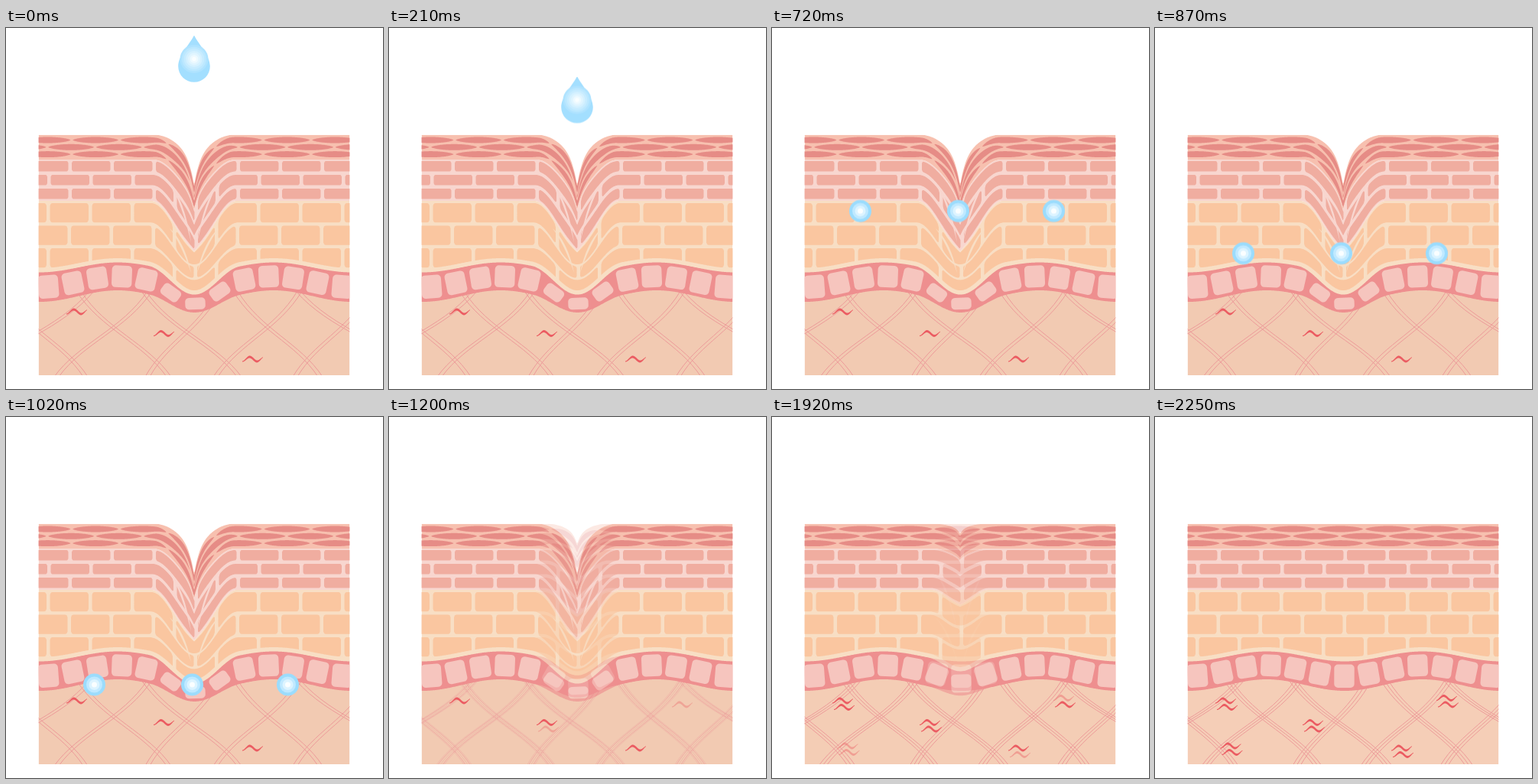
Write an HTML page with a canvas that moves like this. It is 493 by 472 pixels and loops after 2730 ms.

```html
<!DOCTYPE html>
<html lang="en">
<head>
<meta charset="utf-8">
<title>Skin hydration</title>
<style>
html, body { margin: 0; width: 100%; height: 100%; overflow: hidden; background: #fff; }
canvas { display: block; width: 493px; height: 472px; }
</style>
</head>
<body>
<canvas id="stage"></canvas>
<script>
const W = 493, H = 472, LOOP = 2730, STEP = 30;
const LEFT = 42.6, RIGHT = 449.4, TOP = 139.7, BOTTOM = 454, MID = 246;
const CREAM = '#f8dec4', BLUSH = '#f8d6cf';
const dpr = window.devicePixelRatio || 1;

const lerp = (a, b, u) => a + (b - a) * u;
const ramp = (t, a, b) => Math.max(0, Math.min(1, (t - a) / (b - a)));

function setup(canvas) {
  canvas.width = Math.round(W * dpr);
  canvas.height = Math.round(H * dpr);
  const c = canvas.getContext('2d');
  c.scale(dpr, dpr);
  return c;
}

// fibre bundles: x at the top and at the bottom of the dermis
const FIBRES = [
  [-5, 104], [95, 213], [180, 305], [300, 411], [382, 540],
  [112, -40], [188, 66], [278, 185], [384, 274], [478, 378]
];

// pairs of marks: place, and the pose in which each of the two appears
const MARKS = [
  [92.5, 371, 0, 2], [206.5, 399.5, 0, 1], [381.5, 367.5, 3, 1],
  [99, 430, 3, 3], [322.5, 433, 0, 3]
];

// depth of the wrinkle in each pose
const DEPTHS = [1, 0.4, 0.2, 0];

const wave = x => Math.cos((x - 146) / 204 * 2 * Math.PI);

function drawSkin(c, depth, pose) {
  // sharp notch at the surface, a soft and wider bowl further down
  function dip(x, y) {
    if (!depth) return 0;
    const low = ramp(y, TOP, 320);
    const s = Math.min(1, Math.abs(x - MID) / (lerp(30, 52, depth) + 8 * low));
    const sharp = 0.55 * (1 - s) ** 2 + 0.45 * (1 - s) ** 8;
    const soft = (1 + Math.cos(Math.PI * s)) / 2;
    const sink = 66 - 52 * ramp(y, 226, 357);
    return sink * depth ** (1 - low / 2) * lerp(sharp, soft, ramp(y, TOP, 250));
  }
  const warp = (x, y) => y + dip(x, y);
  const edgeTop = x => 313 - 6.5 * wave(x) + dip(x, 319);
  const edgeLow = x => 350.5 - 7.5 * wave(x) + dip(x, 357);

  function ribbon(x0, x1, top, low, color) {
    const n = Math.ceil(x1 - x0), xs = [];
    for (let i = 0; i <= n; i++) xs.push(lerp(x0, x1, i / n));
    c.beginPath();
    xs.forEach(x => c.lineTo(x, top(x)));
    xs.reverse().forEach(x => c.lineTo(x, low(x)));
    c.fillStyle = color;
    c.fill();
  }

  function layer(y0, y1, color) {
    ribbon(LEFT, RIGHT, x => warp(x, y0), x => warp(x, y1), color);
  }

  function brick(x0, x1, y0, y1, r, color) {
    const inset = x => {
      const d = Math.min(r, x - x0, x1 - x);
      return r - Math.sqrt(Math.max(0, r * r - (r - d) ** 2));
    };
    ribbon(x0, x1, x => warp(x, y0 + inset(x)), x => warp(x, y1 - inset(x)), color);
  }

  // three rows, the middle one shifted by half a brick
  function wall(x, y, pitch, height, r, color) {
    for (let row = 0; row < 3; row++) {
      const top = y + row * pitch;
      for (let b = x - row % 2 * 27.5; b < RIGHT; b += 55) {
        brick(b, b + 50.5, top, top + height, r, color);
      }
    }
  }

  function spindles(y, shift) {
    for (let m = 54.5 - shift; m < RIGHT + 30; m += 62.6) {
      const half = x => 4 * Math.max(0, 1 - ((x - m) / 30) ** 2) ** 0.7;
      ribbon(m - 30, m + 30, x => warp(x, y - half(x)), x => warp(x, y + half(x)), '#e68c86');
    }
  }

  // light folds on both sides of the crease
  function folds(y0, y1, color) {
    c.fillStyle = color;
    c.globalAlpha = depth;
    for (const side of [-1, 1]) {
      const x0 = MID + side * 32, x1 = MID + side * 4;
      const x = lerp(x0, x1, 0.7), y = lerp(y0, y1, 0.3);
      c.beginPath();
      c.moveTo(x0, y0);
      c.quadraticCurveTo(x, y, x1, y1);
      c.quadraticCurveTo(x + side * 4, y + 4, x0, y0);
      c.fill();
    }
    c.globalAlpha = 1;
  }

  function fibre(x0, x1) {
    c.beginPath();
    c.moveTo(x0, 344);
    c.bezierCurveTo(lerp(x0, x1, 0.27), 394, lerp(x0, x1, 0.74), 412, x1, 456);
    c.stroke();
  }

  function mark(x, y) {
    const line = v => y + 3 * Math.cos((v - x + 13.5) / 27 * 2.8 * Math.PI);
    const half = v => 0.4 + 1.3 * Math.cos((v - x) / 27 * Math.PI);
    ribbon(x - 13.5, x + 13.5, v => line(v) - half(v), v => line(v) + half(v), '#eb5c62');
  }

  function cell(x) {
    const mid = v => (edgeTop(v) + edgeLow(v)) / 2;
    const a = Math.atan((mid(x + 8) - mid(x - 8)) / 16);
    const h = (edgeLow(x) - edgeTop(x)) * Math.cos(a) - 8;
    c.save();
    c.translate(x, mid(x));
    c.rotate(a);
    c.beginPath();
    c.roundRect(-13.2, -h / 2, 26.4, h, 5);
    c.fillStyle = '#f6c5be';
    c.fill();
    c.restore();
  }

  c.fillStyle = '#fff';
  c.fillRect(0, 0, W, H);
  c.save();
  c.beginPath();
  c.rect(LEFT, TOP, RIGHT - LEFT, BOTTOM - TOP);
  c.clip();

  // dermis
  c.fillStyle = `rgb(${242 + pose},${202 + pose * 1.4},${178 + pose * 1.7})`;
  c.fillRect(LEFT, 325, RIGHT - LEFT, BOTTOM - 325);
  c.strokeStyle = '#ec9a99';
  for (const [x0, x1] of FIBRES) {
    for (const o of pose ? [-5, 0, 5] : [-3, 3]) fibre(x0 + o, x1 + o);
  }
  for (const [x, y, first, second] of MARKS) {
    if (pose >= first) mark(x, y);
    if (pose >= second) mark(x + 2, y + 8.5);
  }

  // lower and middle bricks
  ribbon(LEFT, RIGHT, x => warp(x, 226), edgeTop, CREAM);
  wall(2.5, 229, 29.5, 25.3, 3.5, '#fac6a0');
  layer(172, 226, BLUSH);
  wall(31, 174, 18, 13.5, 2.5, '#f0ada0');
  folds(202, 280, BLUSH);
  folds(262, 320, CREAM);

  // surface
  layer(TOP, 172, '#f7c0af');
  for (let row = 0; row < 3; row++) spindles(146.5 + row * 9.3, row % 2 * 32);

  // basal band
  c.beginPath();
  for (let x = LEFT - 2; x <= RIGHT + 2; x++) c.lineTo(x, edgeTop(x));
  c.strokeStyle = CREAM;
  c.lineWidth = 11;
  c.stroke();
  ribbon(LEFT, RIGHT, edgeTop, edgeLow, '#ee8f8f');
  for (let x = 55.5; x < RIGHT; x += 32) cell(x);
  c.restore();
}

function disc(c, x, y, r, color) {
  c.beginPath();
  c.arc(x, y, r, 0, Math.PI * 2);
  c.fillStyle = color;
  c.fill();
}

// concentric steps from blue to white
function glow(c, x, y, r, n) {
  for (let i = 0; i < n; i++) {
    const u = (i + 1) / n;
    disc(c, x, y, r * (1 - i / n), `rgb(${lerp(163, 250, u)},${lerp(223, 254, u)},255)`);
  }
}

function drawDrop(c) {
  c.translate(MID, 0);
  c.beginPath();
  c.moveTo(0, -0.5);
  c.bezierCurveTo(5, 10, 20.8, 26, 20.8, 40);
  c.arc(0, 40, 20.8, 0, Math.PI);
  c.bezierCurveTo(-20.8, 26, -5, 10, 0, -0.5);
  c.fillStyle = '#a3dfff';
  c.fill();
  glow(c, 0, 30.5, 18.5, 7);
}

function drawDots(c) {
  for (const x of [115.5, 243.5, 368.5]) {
    disc(c, x, 40, 14.5, '#9bdcfd');
    glow(c, x, 40, 10.5, 3);
  }
}

function layerOf(paint) {
  const canvas = document.createElement('canvas');
  paint(setup(canvas));
  return canvas;
}

const poses = DEPTHS.map((d, i) => layerOf(c => drawSkin(c, d, i)));
const drop = layerOf(drawDrop);
const dots = layerOf(drawDots);
const ctx = setup(document.getElementById('stage'));

function put(image, y, alpha) {
  ctx.globalAlpha = alpha;
  ctx.drawImage(image, 0, y, W, H);
}

function render(t) {
  const heal = ramp(t, 1080, 2130) * (poses.length - 1);
  const i = Math.min(Math.floor(heal), poses.length - 2);
  put(poses[i], 0, 1);
  put(poses[i + 1], 0, heal - i);

  const swap = ramp(t, 465, 570);
  put(drop, 10 + t * 0.255, 1 - swap);
  const y = lerp(184, 372, ramp(t, 570, 1080));
  put(dots, y - 40, swap * (1 - ramp(t, 1050, 1140)));
}

const start = performance.now();
function tick() {
  const t = (performance.now() - start) % LOOP;
  render(Math.floor(t / STEP) * STEP);
  requestAnimationFrame(tick);
}
tick();
</script>
</body>
</html>
```
